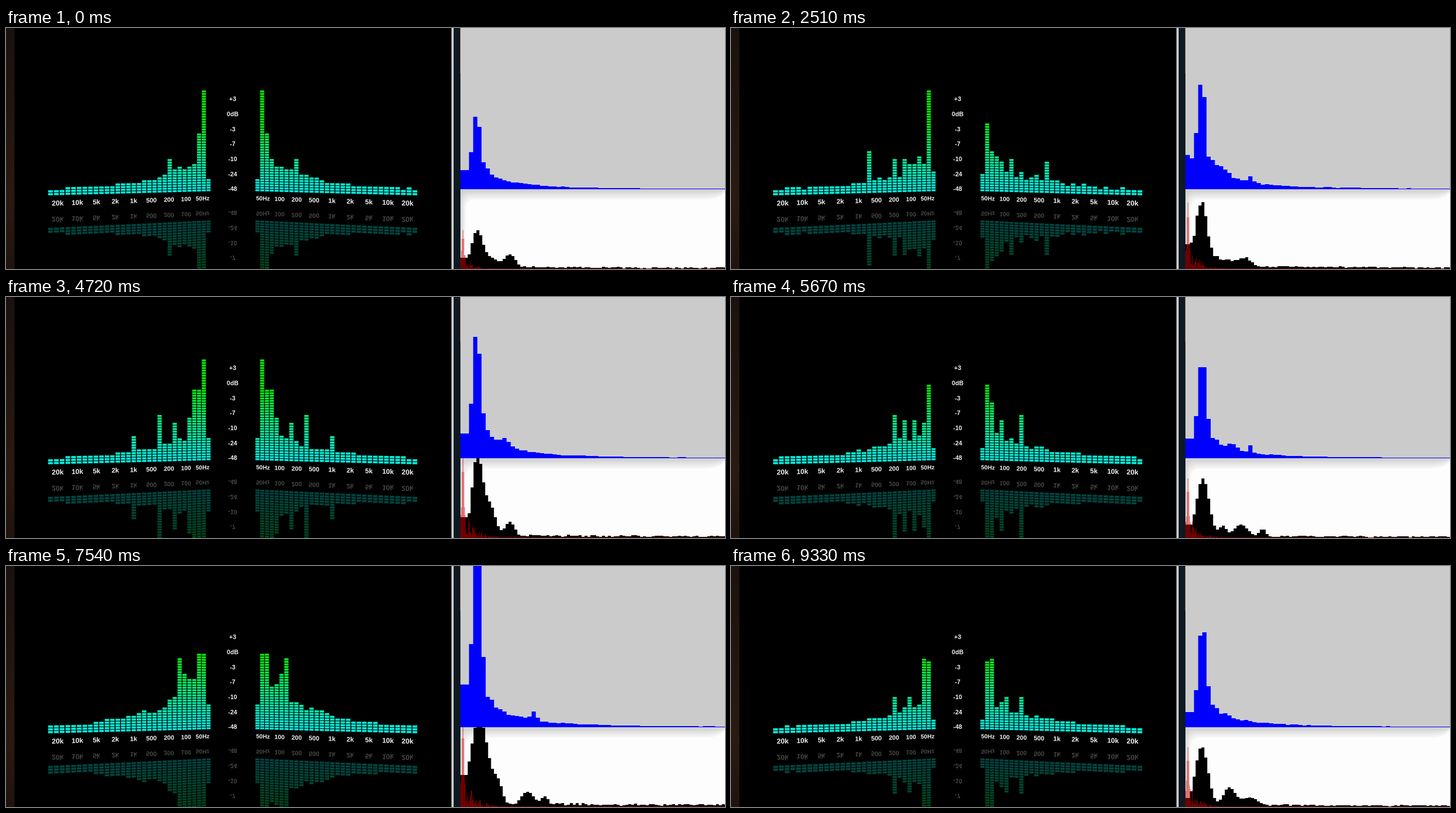
An HTML page with a canvas for the animation above (9480 ms loop, 1280 by 429 pixels).

```html
<!DOCTYPE html>
<html lang="en">
<head>
<meta charset="utf-8">
<title>Spectrum analysers</title>
<style>
html, body { margin: 0; width: 100%; height: 100%; overflow: hidden; background: #000; }
canvas { display: block; width: 100vw; height: 100vh; }
</style>
</head>
<body>
<canvas id="stage" width="1280" height="429"></canvas>
<script>
const ctx = document.getElementById('stage').getContext('2d');
const LOOP = 9480, METER = 31, BINS = 64, FINE = 91;

// Each sound: when it is held, its overall body, its loudest meter bars
// (bar: level) and the humps [centre, height, width] of the two histograms.
const sounds = [
  { time: 0, hold: 210, boost: 1.36, swell: 14, peaks: { 1: 40, 2: 23, 8: 13 },
    lead: 34, peak: 129, next: 111, body: 34, bumps: [],
    low: 20, humps: [[4.8, 69, 2], [10, 17, 2], [16, 26, 2]] },
  { time: 1630, hold: 160, boost: .35, swell: 11, peaks: { 1: 29, 8: 13 },
    left: { 6: 12, 13: 22 }, right: { 6: 17, 13: 13 },
    lead: 24, peak: 100, next: 85, body: 28, bumps: [[8.4, 12, 1], [15, 17, .5]],
    low: 14, humps: [[5.4, 42, 2], [12.7, 15, 2.2], [17.6, 18, 2.2]] },
  { time: 3370, hold: 150, boost: 0, swell: 15, peaks: { 0: 11, 1: 40, 2: 20, 3: 17, 13: 10 },
    lead: 78, peak: 237, next: 155, body: 46, bumps: [],
    low: 54, humps: [[4.3, 170, 2], [10, 23, 1.7], [21, 22, 2]] },
  { time: 4720, hold: 170, boost: .52, swell: 14,
    peaks: { 0: 9, 1: 40, 2: 28, 3: 28, 4: 17, 7: 15, 10: 18, 15: 10 },
    lead: 44, peak: 216, next: 186, body: 46, bumps: [[10.5, 12, 1]],
    low: 37, humps: [[4.8, 148, 1.8], [9.2, 56, 1.9], [16, 29, 1.7]] },
  { time: 5670, hold: 170, boost: .25, swell: 14, peaks: { 1: 30, 4: 16, 8: 18 },
    left: { 6: 16 }, right: { 2: 23 },
    lead: 35, peak: 162, next: 162, body: 36, bumps: [[11, 10, 1], [15, 12, .5]],
    low: 24, humps: [[5, 106, 2.2], [11.8, 20, 1.2], [18, 24, 2.5], [25.5, 16, 1.2]] },
  { time: 7540, hold: 200, boost: 0, swell: 25, peaks: { 0: 10, 1: 30, 2: 30, 5: 22, 6: 28 },
    lead: 76, peak: 290, next: 290, body: 57, bumps: [[17, 16, .7]],
    low: 57, humps: [[5.5, 160, 3], [12, 36, 1.6], [22, 27, 2.3], [28, 18, 1.3]] },
  { time: 9330, hold: 150, boost: 0, swell: 13, peaks: { 1: 27, 2: 28, 5: 13, 8: 13 },
    lead: 27, peak: 163, next: 169, body: 38, bumps: [],
    low: 16, humps: [[4.6, 108, 2.2], [14, 34, 2], [21, 17, 3]] }
];

function rand(a, b) {
  const v = Math.sin(a * 127.1 + b * 311.7) * 43758.5453;
  return v - Math.floor(v);
}

const sway = (seed, i, amount) => 1 + (rand(seed, i) - .5) * amount;
const list = (size, rule) => Array.from({ length: size }, (_, i) => rule(i));
const hills = (set, i) =>
  set.reduce((sum, [c, h, w]) => sum + h * Math.exp(-(((i - c) / w) ** 2) / 2), 0);

function meter(s, own, seed) {
  const loud = { ...s.peaks, ...own };
  return list(METER, i => loud[i] ??
    (i ? 2.1 + s.swell * Math.exp(-i / 8) * sway(seed, i, .4) : s.swell / 3));
}

function blueHeight(s, i) {
  if (i < 2) return s.lead;
  if (i === 2) return Math.sqrt(s.lead * s.peak);
  if (i === 3) return s.peak;
  if (i < 6) return s.next * (i === 4 ? 1 : .43);
  return s.body / (1 + (i - 6) / 10) ** 2 * sway(s.time, i, .25) + hills(s.bumps, i);
}

function blackHeight(s, i) {
  const floor = s.body / 8 / (1 + i / 80) * sway(s.time + 5, i, .9);
  return Math.max(i < 3 ? s.low : floor, hills(s.humps, i));
}

const poses = sounds.map((s, n) => ({
  left: meter(s, s.left, n + 1), right: meter(s, s.right, n + 31),
  blue: list(BINS, i => blueHeight(s, i)), black: list(FINE, i => blackHeight(s, i))
}));

// Moments when the picture advances, pulled onto the held sounds.
const runs = [[210, 1080, 6], [1290, 2210, 7], [2360, 3370, 7], [3520, 4550, 7],
              [4720, 5670, 6], [5840, 6880, 7], [7090, 8130, 6], [8360, 9330, 6]];
const anchors = sounds.flatMap(s => [s.time, s.time + s.hold]);
const steps = [0, ...runs.flatMap(([from, to, n]) => list(n, i => {
  const t = from + (to - from) * i / (n - 1);
  return anchors.find(a => Math.abs(a - t) < 45) ?? t;
}))];

function poseAt(t, seed) {
  const n = sounds.findLastIndex(s => s.time <= t), m = (n + 1) % sounds.length;
  const { time, boost } = sounds[n];
  const u = (t - time) / ((sounds[m].time || LOOP) - time);
  const wave = Math.sin(Math.PI * u), gain = 1 + boost * wave ** 4;
  const mix = (name, salt, amount, level) => poses[n][name].map((v, i) =>
    (v + (poses[m][name][i] - v) * u) * level * sway(seed + salt, i, amount * wave));
  const bars = (name, salt) =>
    mix(name, salt, .6, 1).map(v => Math.max(2, Math.min(40, Math.round(v))));
  return {
    left: bars('left', 1), right: bars('right', 2),
    blue: mix('blue', 3, .25, gain), black: mix('black', 4, .4, gain), seed
  };
}

function rect(x, y, w, h, color) {
  ctx.fillStyle = color;
  ctx.fillRect(x, y, w, h);
}

const mirror = i => 633 + .68 * i;

function drawMeter(levels, side) {
  levels.forEach((n, i) => {
    const w = 7.2 + .045 * i, pitch = 4.5 + .0167 * i, base = 291.6 + .24 * i;
    const x = side < 0 ? 357 - 8.4 * i - .0333 * i * i : 444 + 8.4 * i + .0306 * i * i;
    for (let k = 0; k < n; k++) {
      const y = base - (k + 1) * pitch, h = pitch - 1.1;
      const hue = 176 - 56 * Math.min(1, k / 28) ** 1.3;
      ctx.fillStyle = `hsl(${hue} 95% 48%)`;
      ctx.fillRect(x, y, w, h);
      ctx.globalAlpha = .29;
      ctx.fillRect(x, mirror(i) - y - h, w, h);
      ctx.globalAlpha = 1;
    }
  });
}

function label(text, x, y, size, slope, sum) {
  ctx.font = `bold ${size}px "Liberation Sans", Arial, sans-serif`;
  ctx.fillStyle = '#f0f0f0';
  ctx.setTransform(1, slope, 0, 1, x, y);
  ctx.fillText(text, 0, size * .36);
  ctx.globalAlpha = .29;
  ctx.setTransform(1, -slope, 0, -1, x, sum - y);
  ctx.fillText(text, 0, size * .36);
  ctx.globalAlpha = 1;
  ctx.resetTransform();
}

function drawLabels() {
  ctx.textAlign = 'center';
  ['+3', '0dB', '-3', '-7', '-10', '-24', '-48'].forEach((s, i) =>
    label(s, 403.5, 126.3 + 26.7 * i, 11, 0, 615.8));
  ['50Hz', '100', '200', '500', '1k', '2k', '5k', '10k', '20k'].forEach((s, i) => {
    const size = 10.5 + .27 * i, y = 303.2 + 1.03 * i, sum = mirror(1 + 3.44 * i);
    label(s, 350 - 29.2 * i - .38 * i * i, y, size, -.03, sum);
    label(s, 457.5 + 29.2 * i + .37 * i * i, y, size, .03, sum);
  });
}

function drawBackdrop() {
  rect(0, 0, 1280, 429, '#000');
  const edge = ctx.createLinearGradient(0, 0, 0, 429);
  edge.addColorStop(0, '#1b110e');
  edge.addColorStop(.72, '#2a1a12');
  edge.addColorStop(1, '#20130e');
  rect(0, 0, 15, 429, edge);
  rect(793, 0, 4, 429, '#c8c8c8');
  rect(797, 0, 12, 429, '#0e1a22');
  rect(808, 0, 1, 80, '#5a3a30');
  rect(809, 0, 471, 287, '#cbcbcb');
  rect(809, 287, 471, 142, '#d2d2d2');
  for (let i = 0; i < 5; i++) {
    const x = 809 + 2.3 * i, y = 291 + 3.5 * i, tone = 218 + 8.75 * i;
    ctx.fillStyle = `rgb(${tone} ${tone} ${tone})`;
    ctx.beginPath();
    ctx.moveTo(809, 429);
    ctx.quadraticCurveTo(x, 400, x, 375);
    ctx.lineTo(x, y + 18);
    ctx.quadraticCurveTo(x, y, x + 16, y);
    ctx.lineTo(1245, y);
    ctx.quadraticCurveTo(1270, y, 1280, 287 + 1.3 * i);
    ctx.lineTo(1280, 429);
    ctx.fill();
  }
}

// One outline per histogram keeps neighbouring bars free of seams.
function histogram(heights, start, pitch, base, color) {
  ctx.fillStyle = color;
  ctx.beginPath();
  ctx.moveTo(809, base);
  heights.forEach((h, i) => {
    const y = base - Math.max(1, Math.round(h));
    ctx.lineTo(i ? start + pitch * i : 809, y);
    ctx.lineTo(start + pitch * (i + 1), y);
  });
  ctx.lineTo(1290, base);
  ctx.fill();
}

function drawRed(black, seed) {
  const peak = Math.max(...black);
  for (let j = 0; j < 363; j++) {
    const first = Math.exp(-(((j - 3) / 1.4) ** 2) / 2);
    const decay = .45 * Math.exp(-j / 14) * (.15 + 1.1 * rand(seed + 7, j) ** 1.5);
    const floor = black[FINE - 1] * rand(seed + 8, j) * Math.exp(-j / 150);
    const h = Math.max(1, floor, peak * Math.max(first, decay, j < 7 ? .27 : 0));
    rect(809 + j * 1.3, 429 - h, 1.3, h, 'rgba(215,0,0,.55)');
  }
}

function draw(pose) {
  drawBackdrop();
  drawMeter(pose.left, -1);
  drawMeter(pose.right, 1);
  drawLabels();
  histogram(pose.blue, 809.4, 7.43, 287, '#0000ff');
  ctx.save();
  ctx.beginPath();
  ctx.rect(809, 287, 471, 142);
  ctx.clip();
  histogram(pose.black, 811.5, 5.2, 429, '#000');
  drawRed(pose.black, pose.seed);
  ctx.restore();
}

let shown = -1;
function tick(now) {
  const t = now % LOOP;
  const step = steps.findLastIndex(s => s <= t);
  if (step !== shown) {
    shown = step;
    draw(poseAt(steps[step], step));
  }
  requestAnimationFrame(tick);
}
tick(0);
</script>
</body>
</html>
```
